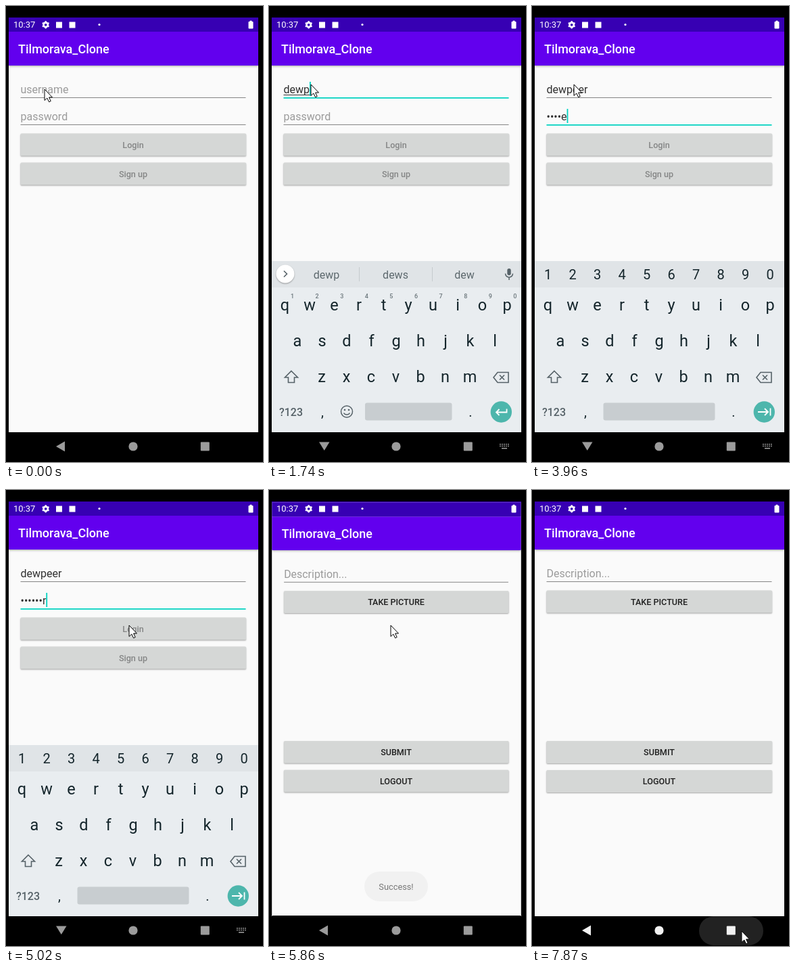
Recreate the animation shown at these times as an HTML page with a canvas. Size 380 px wide and 674 px high, loop 8000 ms.

```html
<!DOCTYPE html>
<html lang="en">
<head>
<meta charset="utf-8">
<title>Login demo</title>
<style>
html, body { margin: 0; width: 100%; height: 100%; overflow: hidden; background: #000; }
canvas { display: block; width: 380px; height: 674px; }
</style>
</head>
<body>
<canvas id="stage"></canvas>
<script>
const LOOP = 8000, TEAL = '#00d2c0', INK = '#14252b', ICON = '#566268';
const canvas = document.getElementById('stage');
const ctx = canvas.getContext('2d');
const dpr = window.devicePixelRatio || 1;
canvas.width = 380 * dpr;
canvas.height = 674 * dpr;

const USER = 'dewpeer';
const userKeys = [[1200, 1], [1460, 3], [1740, 4], [1890, 5], [2010, 7]];
const passKeys = [[3450, 1], [3610, 3], [3770, 4], [3930, 5], [4010, 7]];
const FOCUS = 280, TAB = 2510, LOGGED_IN = 5740;
// time, x, y of the pointer tip
const pointer = [[0, 57, 123], [480, 57, 123], [680, 62, 116], [4480, 62, 116], [4960, 182, 200],
  [5470, 182, 200], [5600, 180, 200], [6790, 180, 200], [7620, 310, 652], [LOOP, 310, 652]];

const clamp = v => Math.max(0, Math.min(1, v));
const span = (t, a, b) => clamp((t - a) / (b - a));
const smooth = p => p * p * (3 - 2 * p);
const typedCount = (keys, t) => keys.reduce((n, [at, count]) => t >= at ? count : n, 0);

function rect(x, y, w, h, fill, r = 0) {
  ctx.fillStyle = fill;
  ctx.beginPath();
  ctx.roundRect(x, y, w, h, r);
  ctx.fill();
}
function disc(x, y, r, fill) {
  ctx.fillStyle = fill;
  ctx.beginPath();
  ctx.arc(x, y, r, 0, 7);
  ctx.fill();
}
function path(d, fill, stroke, width = 1.6) {
  const p = new Path2D(d);
  if (fill) { ctx.fillStyle = fill; ctx.fill(p); }
  if (stroke) { ctx.strokeStyle = stroke; ctx.lineWidth = width; ctx.stroke(p); }
}
function text(str, x, y, size, color, align = 'left', weight = 400) {
  ctx.font = `${weight} ${size}px Roboto, sans-serif`;
  ctx.fillStyle = color;
  ctx.textAlign = align;
  ctx.fillText(str, x, y);
}
function shadowed(blur, dy, draw) {
  ctx.save();
  ctx.shadowColor = 'rgba(0,0,0,.35)';
  ctx.shadowBlur = blur * dpr;
  ctx.shadowOffsetY = dy * dpr;
  draw();
  ctx.restore();
}

function button(label, y, color) {
  shadowed(2, 1, () => rect(21.5, y, 333.5, 33, '#d5d7d6', 1.5));
  text(label, 188, y + 21.3, 12.6, color, 'center', 500);
}

function field(baseline, hint, value, focused, caret, composing) {
  text(value || hint, 21.5, baseline, 16, value ? '#303030' : '#9b9b9b');
  const w = value ? ctx.measureText(value).width : 0;
  if (focused) rect(21.5, baseline + 6, 333, 1.8, TEAL);
  else rect(21.5, baseline + 6, 333, 1, '#858585');
  if (composing && value) rect(21.5, baseline + 2, w, 1, '#303030');
  if (caret) rect(21.5 + w, baseline - 17, 1.8, 21, TEAL);
}

function appWindow(content) {
  rect(4, 17, 369, 657, '#000');
  rect(4, 17, 369, 613, '#fafafa');
  shadowed(3, 1, () => rect(4, 38, 369, 50, '#6200ee'));
  rect(4, 17, 369, 21, '#3700b3');
  text('Tilmorava_Clone', 18, 70, 18, '#fff', 'left', 500);
  content();
}

function loginScreen(t) {
  const onPass = t >= TAB;
  const name = USER.slice(0, typedCount(userKeys, t));
  const n = typedCount(passKeys, t);
  const secret = n ? '•'.repeat(n - 1) + USER[n - 1] : '';
  const blink = t < 3450 ? t < 3170 : t < 4480 || (t >= 4980 && t < 5470);
  field(129, 'username', name, t >= FOCUS && !onPass, t >= FOCUS && !onPass, !onPass);
  field(169, 'password', secret, onPass, onPass && blink);
  button('Login', 188.5, '#858686');
  button('Sign up', 231.5, '#858686');
}

function postScreen() {
  field(129, 'Description...', '');
  button('TAKE PICTURE', 148.5, '#202020');
  button('SUBMIT', 371, '#202020');
  button('LOGOUT', 414, '#202020');
}

function suggestions(t) {
  const n = typedCount(userKeys, t);
  const words = n === 0 ? [] : n === 1 ? ['d', 'do', 'day']
    : [USER.slice(0, n), 'dews', n === 3 ? 'dewy' : 'dew'];
  words.forEach((word, i) => text(word, 85 + 102 * i, 402.5, 16, '#5c686d', 'center'));
  rect(133, 386, 1, 21, '#c5cbce');
  rect(241, 386, 1, 21, '#c5cbce');
  shadowed(2, 1, () => disc(24, 396, 13.5, '#fff'));
  path('M22 391.5l4.5 4.5l-4.5 4.5', null, ICON);
  rect(352.3, 388, 5.4, 10, ICON, 2.7);
  path('M349.5 395.5a5.5 5.5 0 0 0 11 0M355 401v4', null, ICON, 1.5);
}

function keyRow(keys, x, baseline, size = 23.5) {
  [...keys].forEach((key, i) => text(key, x + 36.5 * i, baseline, size, INK, 'center'));
}

function keyboard(t) {
  const numeric = t >= TAB;
  rect(4, 377, 369, 253, '#e9edf0');
  rect(4, 377, 369, 39, '#e0e4e7');
  if (numeric) keyRow('1234567890', 23.5, 404, 20);
  else {
    suggestions(t);
    [...'1234567890'].forEach((d, i) => text(d, 34.5 + 36.6 * i, 432, 9, '#6b767b', 'center', 500));
  }
  keyRow('qwertyuiop', 23.5, 450);
  keyRow('asdfghjkl', 42, 502.5);
  keyRow('zxcvbnm', 78, 555.5);
  path('M33 539.5l9.5 9.5h-5v7.5h-9v-7.5h-5z', null, ICON);
  path('M332 549l6-7.5h16v15h-16zM341 545.5l7 7m0-7l-7 7', null, ICON);
  text('?123', 32.5, 605.5, 16, ICON, 'center', 500);
  text(',', 79, 607, 20, INK, 'center');
  text('.', 298, 607, 20, INK, 'center');
  const spaceX = numeric ? 105.5 : 142;
  rect(spaceX, 586.5, 270.5 - spaceX, 26, '#c8cdd0', 3);
  if (!numeric) {
    path('M123.5 599.5a8.5 8.5 0 1 0-17 0a8.5 8.5 0 1 0 17 0M110.5 601.5a5 4.5 0 0 0 9 0', null, ICON, 1.5);
    disc(112, 597, 1.3, ICON);
    disc(118, 597, 1.3, ICON);
  }
  disc(343.3, 600, 15.7, '#4db6ac');
  path(numeric ? 'M334 600h15M344 595l5 5l-5 5M352.5 594.5v11'
    : 'M351.5 595.5v5h-15.5M340.5 596l-4.5 4.5l4.5 4.5', null, '#fff', 1.8);
}

function statusBar() {
  text('10:37', 11, 32.3, 13, '#fff');
  ctx.strokeStyle = '#fff';
  ctx.lineWidth = 2.6;
  ctx.beginPath();
  ctx.arc(58.7, 27.8, 3.2, 0, 7);
  ctx.stroke();
  for (let i = 0; i < 6; i++) {
    const a = i * Math.PI / 3 + Math.PI / 6;
    disc(58.7 + 4.4 * Math.cos(a), 27.8 + 4.4 * Math.sin(a), 1.3, '#fff');
  }
  rect(74, 23.5, 9, 9, '#fff');
  rect(93.5, 23.5, 9, 9, '#fff');
  disc(138, 27.5, 1.6, '#fff');
  rect(358.5, 23, 7, 10.5, '#fff', 1);
  rect(360.5, 21.7, 3, 2, '#fff');
}

function navBar(t, typing) {
  rect(0, 630, 380, 44, '#000');
  if (t >= 7700) {
    const half = 43 + 4.5 * span(t, 7700, 7850);
    rect(294.5 - half, 630, half * 2, 43, '#222', 21.5);
  }
  const color = t >= 7870 ? '#f2f2f2' : '#9b9b9b';
  path(typing ? 'M74 644.5h15.5l-7.75 12.5z' : 'M74 651l13-7.5v15z', color);
  disc(188, 651, 6.6, color);
  rect(287.8, 644.5, 13, 13, color, 1);
  if (typing) {
    for (let i = 0; i < 10; i++) rect(341 + 3 * (i % 5), 647 + 2.7 * (i / 5 | 0), 1.8, 1.6, color);
    rect(344, 653, 8, 1.6, color);
  }
}

function toast(t) {
  ctx.save();
  ctx.globalAlpha = span(t, 5680, 5930) * (1 - span(t, 7520, 7720));
  rect(141, 564, 94, 44, '#efefef', 22);
  text('Success!', 188, 591, 12.8, '#4a4a4a', 'center');
  ctx.restore();
}

function drawPointer(t) {
  const i = pointer.findIndex(k => k[0] > t);
  const [t0, x0, y0] = pointer[i - 1], [t1, x1, y1] = pointer[i];
  const p = smooth(span(t, t0, t1));
  ctx.save();
  ctx.translate(x0 + (x1 - x0) * p, y0 + (y1 - y0) * p);
  path('M0 0V16.5L3.8 13L6.6 18.8L9.2 17.6L6.6 12H11.5Z', '#fff', '#000', 1);
  ctx.restore();
}

function draw(t) {
  ctx.setTransform(dpr, 0, 0, dpr, 0, 0);
  rect(0, 0, 380, 674, '#000');
  ctx.save();
  ctx.beginPath();
  ctx.rect(4, 17, 369, 657);
  ctx.clip();
  if (t < 6020) appWindow(() => loginScreen(t));
  if (t >= LOGGED_IN) {
    const scale = 1 - 0.15 * (1 - span(t, 5620, 6020)) ** 4;
    ctx.save();
    ctx.translate(188.5, 345);
    ctx.scale(scale, scale);
    ctx.translate(-188.5, -345);
    appWindow(postScreen);
    ctx.restore();
  }
  const shown = smooth(span(t, 450, 700)) * (1 - span(t, LOGGED_IN - 1, LOGGED_IN + 110));
  if (shown > 0) {
    ctx.save();
    ctx.globalAlpha = shown;
    ctx.translate(0, 253 * (1 - shown));
    keyboard(t);
    ctx.restore();
  }
  toast(t);
  statusBar();
  ctx.restore();
  navBar(t, t >= 480 && t < LOGGED_IN);
  drawPointer(t);
}

function frame() {
  draw(performance.now() % LOOP);
  requestAnimationFrame(frame);
}
frame();
</script>
</body>
</html>
```
